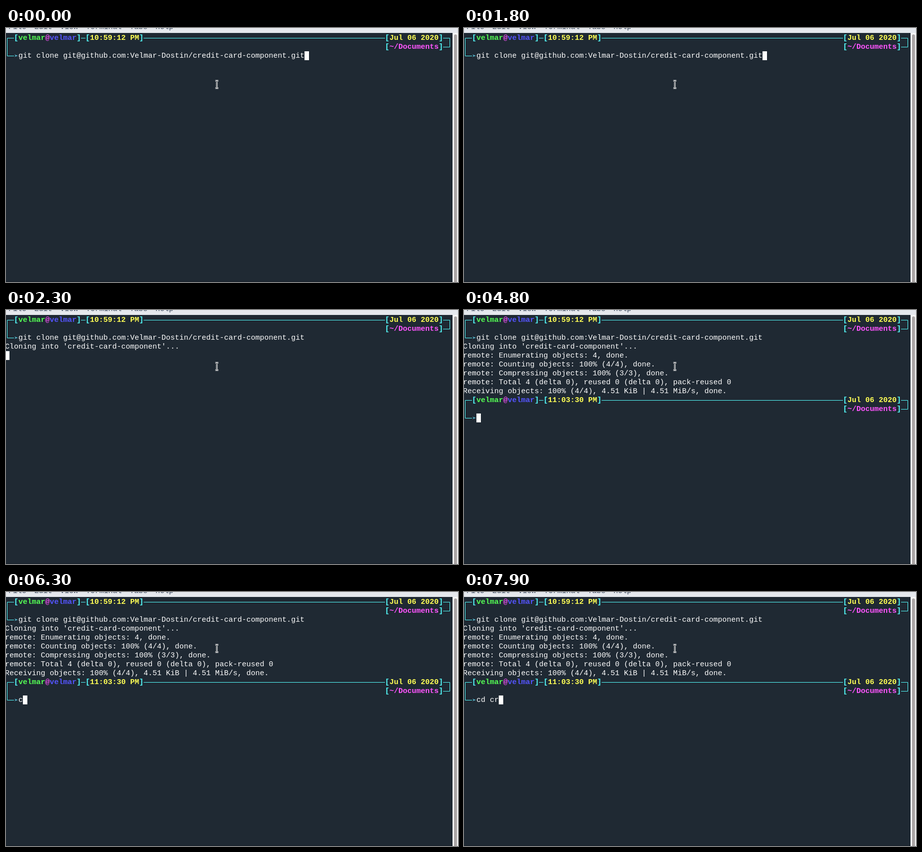
Recreate the animation shown at these times as an HTML page. Size 910 by 513 pixels, loop 8 s.

```html
<!DOCTYPE html>
<html lang="en">
<head>
<meta charset="utf-8">
<title>Terminal</title>
<style>
  html, body { margin: 0; width: 100%; height: 100%; overflow: hidden; background: #1f2933; }
  svg { display: block; width: 910px; height: 513px; }
  text { font: 15px "Liberation Mono", monospace; white-space: pre; }
  .bold { font-weight: bold; }
</style>
</head>
<body>
<svg id="stage" viewBox="0 0 910 513"></svg>
<script>
const NS = "http://www.w3.org/2000/svg";
const stage = document.getElementById("stage");
const LOOP = 8000, CELL = 9, LINE = 18, LEFT = -2, TOP = 11;
const BG = "#1f2933", WHITE = "#ffffff", CYAN = "#55ffff", GREEN = "#55ff55",
      BLUE = "#5555ff", PINK = "#ff55ff", YELLOW = "#ffff55";

const colX = col => LEFT + col * CELL;
const rowY = row => TOP + row * LINE;

function add(parent, tag, attrs, content) {
  const el = document.createElementNS(NS, tag);
  for (const key in attrs) el.setAttribute(key, attrs[key]);
  if (content !== undefined) el.textContent = content;
  parent.appendChild(el);
  return el;
}

const rect = (x, y, width, height, fill, rx = 0) =>
  add(stage, "rect", { x, y, width, height, fill, rx });

const print = (parent, col, row, str, fill = WHITE, cls = "") =>
  add(parent, "text", { x: colX(col), y: rowY(row) + 13, fill, class: cls }, str);

// Two-line status frame followed by the input row.
function addPrompt(row, time) {
  const g = add(stage, "g", {});
  const bold = (col, r, str, fill) => print(g, col, row + r, str, fill, "bold");
  const y = rowY(row) + 9.5;
  add(g, "path", {
    d: `M16 ${y}H2.5V${y + 36}H16M151 ${y}h9M277 ${y}H763M880 ${y}h13.5v18H880`,
    fill: "none", stroke: CYAN, "stroke-width": 1
  });
  [[2, "["], [16, "]"], [18, "["], [30, "]"], [85, "["], [97, "]"]]
    .forEach(([col, str]) => bold(col, 0, str, CYAN));
  bold(3, 0, "velmar", GREEN);
  bold(9, 0, "@", PINK);
  bold(10, 0, "velmar", BLUE);
  bold(19, 0, time, YELLOW);
  bold(86, 0, "Jul 06 2020", YELLOW);
  bold(85, 1, "[", CYAN);
  bold(86, 1, "~/Documents", PINK);
  bold(97, 1, "]", CYAN);
  add(g, "path", { d: `M17 ${y + 33}l7 2.5l-7 2.5l2 -2.5z`, fill: "#58b4cc" });
  return g;
}

// Window chrome
rect(0, 0, 910, 513, BG);
rect(0, 511, 899, 2, "#1b242e");
rect(0, 0, 910, 10, "#e5e8ed");
let menuX = 5;
for (const item of ["File", "Edit", "View", "Terminal", "Tabs", "Help"]) {
  add(stage, "text", { x: menuX, y: 2, fill: "#3e4c60" }, item);
  menuX += item.length * CELL + 16;
}
rect(899, 10, 11, 503, "#f8f8f8");
rect(902, 13, 6, 510, "#aaa5a5", 3);

// Terminal contents
addPrompt(0, "10:59:12 PM");
print(stage, 3, 2, "git clone git@github.com:Velmar-Dostin/credit-card-component.git");
const cloning = print(stage, 0, 3, "Cloning into 'credit-card-component'...");
const report = add(stage, "g", {});
[
  "remote: Enumerating objects: 4, done.",
  "remote: Counting objects: 100% (4/4), done.",
  "remote: Compressing objects: 100% (3/3), done.",
  "remote: Total 4 (delta 0), reused 0 (delta 0), pack-reused 0",
  "Receiving objects: 100% (4/4), 4.51 KiB | 4.51 MiB/s, done."
].forEach((str, i) => print(report, 0, 4 + i, str));
const nextPrompt = addPrompt(9, "11:03:30 PM");
const typed = print(stage, 3, 11, "");

const caret = rect(0, 0, CELL, LINE, WHITE);
const caretChar = print(stage, 66, 2, "t", BG);

// I-beam pointer
const beam = "M421.5 106.5h2l1 1l1 -1h2M424.5 107.5v13M421.5 121.5h2l1 -1l1 1h2";
add(stage, "path", { d: beam, fill: "none", stroke: WHITE, "stroke-width": 3 });
add(stage, "path", { d: beam, fill: "none", stroke: "#10161c", "stroke-width": 1 });

const COMMAND = "cd cr";
const KEY_TIMES = [6300, 6800, 7400, 7700, 7900];

const show = (el, on) => el.setAttribute("visibility", on ? "visible" : "hidden");

function caretCell(t, count) {
  if (t < 2300) return [t >= 1500 && t < 1800 ? 66 : 67, 2];
  if (t < 4600) return [0, 4];
  if (t < 4800) return [0, 9];
  return [3 + count, 11];
}

function draw(t) {
  const count = KEY_TIMES.filter(k => t >= k).length;
  const [col, row] = caretCell(t, count);
  show(cloning, t >= 2300);
  show(report, t >= 4600);
  show(nextPrompt, t >= 4800);
  show(caretChar, col === 66);
  typed.textContent = COMMAND.slice(0, count);
  caret.setAttribute("x", colX(col));
  caret.setAttribute("y", rowY(row));
}

const start = performance.now();
function tick() {
  draw((performance.now() - start) % LOOP);
  requestAnimationFrame(tick);
}
tick();
</script>
</body>
</html>
```
